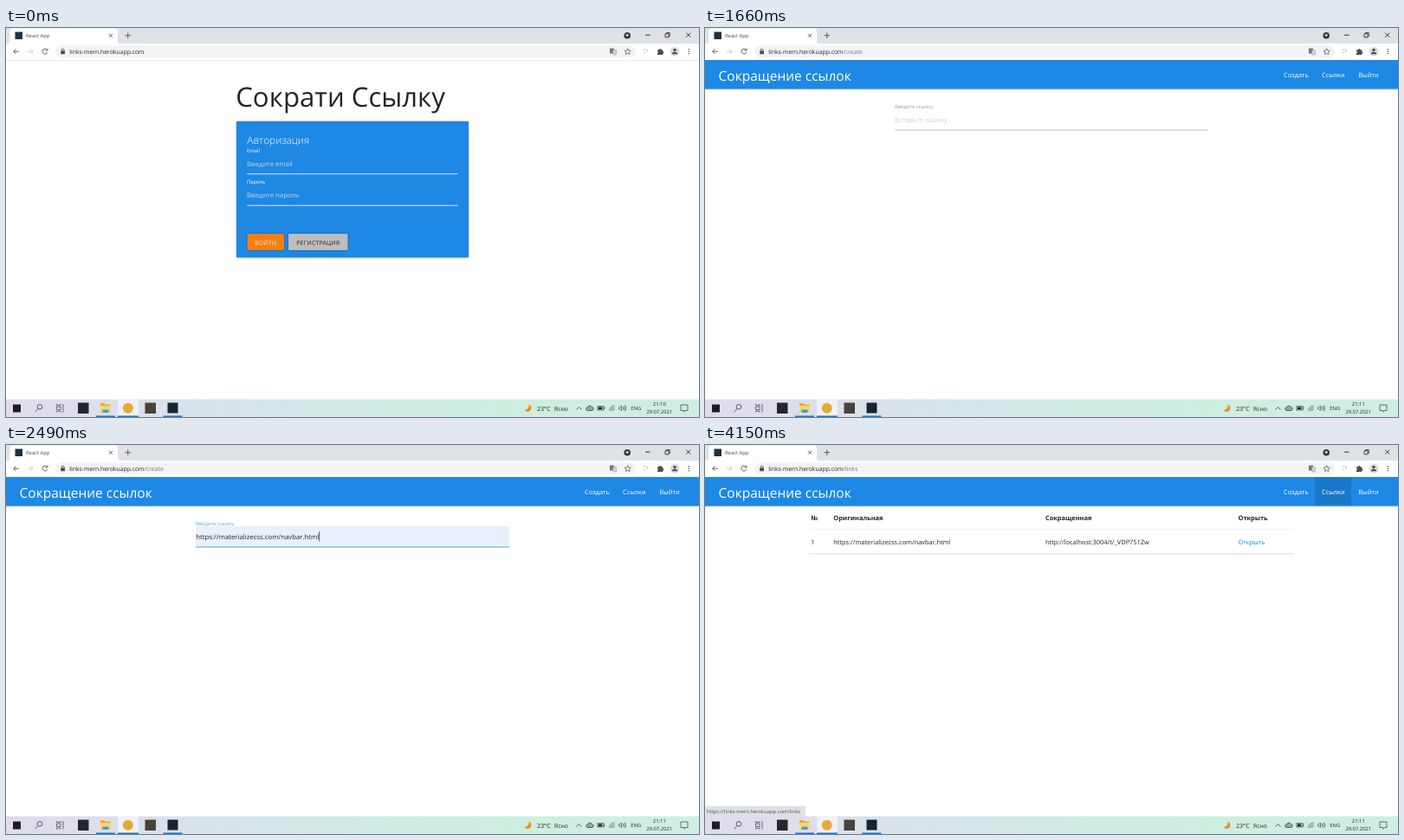
Write an HTML page that moves like this. It is 800 by 450 pixels and loops after 4980 ms.

```html
<!DOCTYPE html>
<html lang="ru">
<head>
<meta charset="utf-8">
<title>React App</title>
<style>
  html, body { margin: 0; width: 100%; height: 100%; overflow: hidden; background: #fff; }
  svg { display: block; width: 800px; height: 450px; }
  text { font-family: "Open Sans", "Noto Sans", sans-serif; text-rendering: geometricPrecision; white-space: pre; }
  .line { fill: none; stroke: #4a4d51; stroke-width: .9; }
  .small { font-size: 5.85px; }
  .body { font-size: 7.4px; }
  .input { font-size: 7.75px; }
  .button { font-size: 6.8px; letter-spacing: .26px; text-anchor: middle; }
  .mid { text-anchor: middle; }
  .bold { font-weight: 700; }
  .link { fill: #039be5; }
  .raised { filter: drop-shadow(0 .7px .9px rgba(0, 0, 0, .4)); }
</style>
</head>
<body>
<svg viewBox="0 0 800 450" fill="#212529">
  <defs>
    <linearGradient id="bar">
      <stop offset="0" stop-color="#e0dcea"/>
      <stop offset=".2" stop-color="#dbe0ea"/>
      <stop offset=".45" stop-color="#d1e8e6"/>
      <stop offset=".75" stop-color="#ccefdf"/>
      <stop offset="1" stop-color="#d0ede4"/>
    </linearGradient>
  </defs>
  <rect width="800" height="450" fill="#fff"/>

  <!-- Login page -->
  <g data-on="01">
    <path d="M0 37.5H800" stroke="#dfe1e4" stroke-width=".7"/>
    <text x="265.2" y="91" font-size="31.2">Сократи Ссылку</text>
    <rect class="raised" x="266" y="108" width="268" height="157.5" rx="1" fill="#1e88e5"/>
    <path d="M266 229.5H534" stroke="#a0a0a0" stroke-opacity=".2" stroke-width=".6"/>
    <g fill="#fff">
      <text x="278.3" y="133.8" font-size="11.8" font-weight="300">Авторизация</text>
      <text class="small" x="278" y="144.3">Email</text>
    </g>
    <g class="raised">
      <rect x="278.5" y="238" width="42.5" height="19" rx="1" fill="#f57f17"/>
      <rect x="326" y="238" width="68.5" height="19" rx="1" fill="#bdbdbd"/>
    </g>
    <text class="button" x="299.7" y="250.5" fill="#f9e3cc">ВОЙТИ</text>
    <text class="button" x="360.3" y="250.5">РЕГИСТРАЦИЯ</text>
  </g>
  <g data-on="0" fill="#fff">
    <path d="M278.3 168.8H521.7M278.3 205.3H521.7" stroke="#dbe6f0"/>
    <text class="small" x="278" y="180.3">Пароль</text>
    <g class="input" fill="#d1d1d1">
      <text x="278" y="160">Введите email</text>
      <text x="278" y="196.3">Введите пароль</text>
    </g>
  </g>
  <g data-on="1">
    <rect x="278.3" y="145" width="243.4" height="24.2" fill="#e8f0fe"/>
    <text class="input" x="278.5" y="160">doremin42@box.test</text>
    <text class="small" x="278" y="180.3" fill="#e5dc8e">Пароль</text>
    <path d="M279.8 193.5H305" stroke="#1b2733" stroke-width="1.9" stroke-linecap="round" stroke-dasharray="0 3.5"/>
    <path d="M278.3 205.3H521.7" stroke="#c9c77b" stroke-width="1.2"/>
  </g>

  <!-- Signed-in pages -->
  <g data-on="2345">
    <rect class="raised" y="37" width="800" height="33.5" fill="#1e88e5"/>
    <rect data-on="5" x="704" y="37" width="42" height="33.5" fill="#000" fill-opacity=".12"/>
    <g class="body" fill="#fff">
      <text x="15.5" y="60.5" font-size="15.5">Сокращение ссылок</text>
      <text x="668" y="57">Создать</text>
      <text x="712" y="57">Ссылки</text>
      <text x="754.3" y="57">Выйти</text>
    </g>
  </g>
  <g data-on="2">
    <text class="small" x="219" y="93.2" fill="#9e9e9e">Введите ссылку</text>
    <text class="input" x="219" y="109.2" fill="#d1d1d1">Вставьте ссылку</text>
    <path d="M219 118H581" stroke="#c4c4c4"/>
  </g>
  <g data-on="3">
    <text class="small" x="219" y="93.2" fill="#4db6ac">Введите ссылку</text>
    <rect x="219" y="94" width="362" height="24" fill="#e8f0fe"/>
    <text class="input" x="219.3" y="109.2">https://materializecss.com/navbar.html</text>
    <path d="M361.7 100V111.5" stroke="#222" stroke-width=".7"/>
    <path d="M219 118H581" stroke="#4db6ac"/>
  </g>
  <g data-on="4" class="body">
    <text x="119.3" y="115.8" font-size="27.4">Ссылка</text>
    <text x="120" y="139">Ваша ссылка:</text>
    <text x="169.5" y="139" class="link">http://localhost:3004/t/_VDP751Zw</text>
    <text x="120" y="158.5">Откуда:</text>
    <text x="149" y="158.5" class="link">https://materializecss.com/navbar.html</text>
    <text x="120" y="178">Количество кликов по ссылке:</text>
    <text x="231" y="178" class="bold">0</text>
    <text x="120" y="197.5">Дата создания:</text>
    <text x="175" y="197.5" class="bold">17.07.2021</text>
  </g>
  <g data-on="5" class="body">
    <g class="bold">
      <text x="122.5" y="87">№</text>
      <text x="148.3" y="87">Оригинальная</text>
      <text x="393" y="87">Сокращенная</text>
      <text x="615.5" y="87">Открыть</text>
    </g>
    <text x="122.5" y="114.7">1</text>
    <text x="148.3" y="114.7">https://materializecss.com/navbar.html</text>
    <text x="393" y="114.7">http://localhost:3004/t/_VDP751Zw</text>
    <text x="615.5" y="114.7" class="link">Открыть</text>
    <path d="M120 97.5H680" stroke="#ececec" stroke-width=".7"/>
    <path d="M120 126H680" stroke="#d6d6d6" stroke-width=".9"/>
    <path d="M0 417.5H114Q116 417.5 116 419.5V430H0Z" fill="#dee1e6"/>
    <text class="small" x="2" y="425.7" fill="#4f5358">https://links-mern.herokuapp.com/links</text>
  </g>

  <!-- Browser frame -->
  <rect width="800" height="18" fill="#dee1e6"/>
  <path d="M2 18Q4.5 18 4.5 15.5V4Q4.5 .5 8 .5H125.5Q129 .5 129 4V15.5Q129 18 131.5 18Z" fill="#fff"/>
  <rect y="18" width="800" height="19" fill="#fff"/>
  <rect x="57" y="20.5" width="670" height="13.5" rx="6.75" fill="#f1f3f4"/>
  <rect x="10.5" y="4.5" width="8.5" height="8.5" fill="#20303c"/>
  <text class="small" x="23" y="11" fill="#45494d">React App</text>
  <g class="line">
    <path d="M119 6.7l4 4m0-4l-4 4M137.5 8.7h6.5m-3.25-3.25v6.5"/>
    <path d="M738 8.2h5.5M785.2 5.7l5 5m0-5l-5 5" stroke="#222"/>
    <path d="M761 6.8h4v4h-4zM762.3 6.5v-1h4v4h-1" stroke="#222" stroke-width=".8"/>
    <path d="M14.8 27.2h-6m2.7-2.8l-2.8 2.8l2.8 2.8"/>
    <path d="M25 27.2h6m-2.7-2.8l2.8 2.8l-2.8 2.8" stroke="#c0c3c6"/>
    <path d="M47.5 25.2a3 3 0 1 0 .4 3M48 23.7v2.3h-2.4"/>
    <path d="M64.2 26.5v-1a1.4 1.4 0 0 1 2.8 0v1"/>
    <path d="M717.7 23.7l1.1 2.3 2.5.3-1.8 1.7.4 2.5-2.2-1.2-2.2 1.2.4-2.5-1.8-1.7 2.5-.3z" stroke-width=".7"/>
    <path d="M735.5 25.5l2-1m1 0l2.5 1.5m-5 2l2 1.5m1-2l2-1" stroke="#b4b7ba"/>
  </g>
  <circle cx="717.2" cy="8.7" r="3.8" fill="#34373b"/>
  <path d="M715.3 7.6h3.8l-1.9 2.7z" fill="#fff"/>
  <rect x="63.2" y="26.3" width="4.8" height="4" rx=".6" fill="#4a4d51"/>
  <g fill="#4a4d51">
    <rect x="697" y="23.5" width="5" height="6" rx=".6" fill="#73777b"/>
    <rect x="700.5" y="25.5" width="4" height="5.5" rx=".5" fill="#d2d4d6" stroke="#85898d" stroke-width=".5"/>
    <path d="M752 25.2h2a1.2 1.2 0 0 1 2.4 0h1.8v2a1.2 1.2 0 0 1 0 2.4v1.4h-6.2v-1.8a1.2 1.2 0 0 0 0-2.3z"/>
    <circle cx="772" cy="27.2" r="5.3" fill="#d5dbe2"/>
    <circle cx="772" cy="25.5" r="1.7"/>
    <path d="M768.8 30.3q0-2.5 3.2-2.5t3.2 2.5z"/>
    <circle cx="788.3" cy="24.7" r=".75"/>
    <circle cx="788.3" cy="27.2" r=".75"/>
    <circle cx="788.3" cy="29.7" r=".75"/>
  </g>
  <g data-on="1" class="line">
    <circle cx="682.8" cy="27.2" r="1.5"/>
    <path d="M684.3 27.2h3.7m-1 0v1.6" stroke-width="1.2"/>
  </g>
  <text x="73.3" y="29.7" font-size="6.85">links-mern.herokuapp.com<tspan id="path" fill="#74787c"></tspan></text>

  <!-- Taskbar -->
  <rect y="429.5" width="800" height="20.5" fill="url(#bar)"/>
  <rect x="129" y="429.5" width="24" height="20.5" fill="#fff" fill-opacity=".55"/>
  <path d="M104 449.2h22M129 449.2h24M181.5 449.2h22" stroke="#0f78d0" stroke-width="1.6"/>
  <rect x="8" y="435.5" width="9" height="9" fill="#1d1d22"/>
  <rect x="83" y="433.5" width="12.5" height="12.5" fill="#24262c"/>
  <path d="M109 434h4.5l1 1.5h6v9.5h-11.5z" fill="#e9a92f"/>
  <path d="M109 437h12v8h-12z" fill="#fbd569"/>
  <path d="M111.5 445v-3.5h7v3.5z" fill="#3e9de0"/>
  <circle cx="140.8" cy="439.7" r="6" fill="#e2ab38"/>
  <rect x="160.5" y="433.5" width="12.5" height="12.5" fill="#48423b"/>
  <rect x="186.5" y="433.5" width="12" height="12" fill="#16252f"/>
  <g class="line" stroke="#2b2d30">
    <circle cx="39" cy="438.3" r="2.8"/>
    <path d="M37 440.5l-3.3 3.5"/>
    <path d="M58.5 438h4.5v3.5h-4.5zM58.5 435v1.3h4.5v-1.3M58.5 444.5v-1.3h4.5v1.3M66 435v9.5" stroke-width=".8"/>
    <path d="M658.5 441.5l3-3 3 3"/>
    <path d="M671.5 442.5a1.8 1.8 0 0 1 0-3.6a2.7 2.7 0 0 1 5-.3a2 2 0 0 1 .2 3.9z" fill="#9da5a6"/>
    <rect x="683" y="437.7" width="7" height="4.2"/>
    <path d="M690.8 438.7v2.2"/>
    <path d="M696.5 443a6 6 0 0 1 6-6M698.5 443a4 4 0 0 1 4-4M700.5 443a2 2 0 0 1 2-2" stroke-width=".7"/>
    <path d="M707.5 438.7h1.3l1.7-1.7v5.6l-1.7-1.7h-1.3zM712 438.3q1 1.5 0 3M713.3 437.3q1.7 2.5 0 5M714.7 436.5q2.2 3.3 0 6.6" stroke-width=".7"/>
    <path d="M779 436h8v6.5h-2.5l-1.5 1.7v-1.7h-4z" stroke-width=".8"/>
  </g>
  <rect x="684" y="438.5" width="4.3" height="2.6"/>
  <path d="M603.5 435.5a4.3 4.3 0 1 1-5 6.3a5 5 0 0 0 5-6.3z" fill="#f08c1e"/>
  <text x="613" y="442.5" font-size="7.1">23°C</text>
  <text x="632.8" y="442.5" font-size="6.9">Ясно</text>
  <text class="small" x="721.3" y="442">ENG</text>
  <text class="small mid" x="754.3" y="437.2" id="clock"></text>
  <text class="small mid" x="754.3" y="446">29.07.2021</text>
</svg>
<script>
  const STEP = 830;
  const paths = ["", "", "/create", "/create", "/detail/60f3377f0742e5291071e564", "/links"];
  const parts = document.querySelectorAll("[data-on]");
  const path = document.getElementById("path");
  const clock = document.getElementById("clock");
  const start = performance.now();
  let shown = -1;

  function show(scene) {
    for (const part of parts) part.style.display = part.dataset.on.includes(scene) ? "" : "none";
    path.textContent = paths[scene];
    clock.textContent = scene < 2 ? "21:10" : "21:11";
    shown = scene;
  }

  function tick() {
    const elapsed = Math.max(0, performance.now() - start);
    const scene = Math.floor(elapsed / STEP) % paths.length;
    if (scene !== shown) show(scene);
    requestAnimationFrame(tick);
  }
  tick();
</script>
</body>
</html>
```
